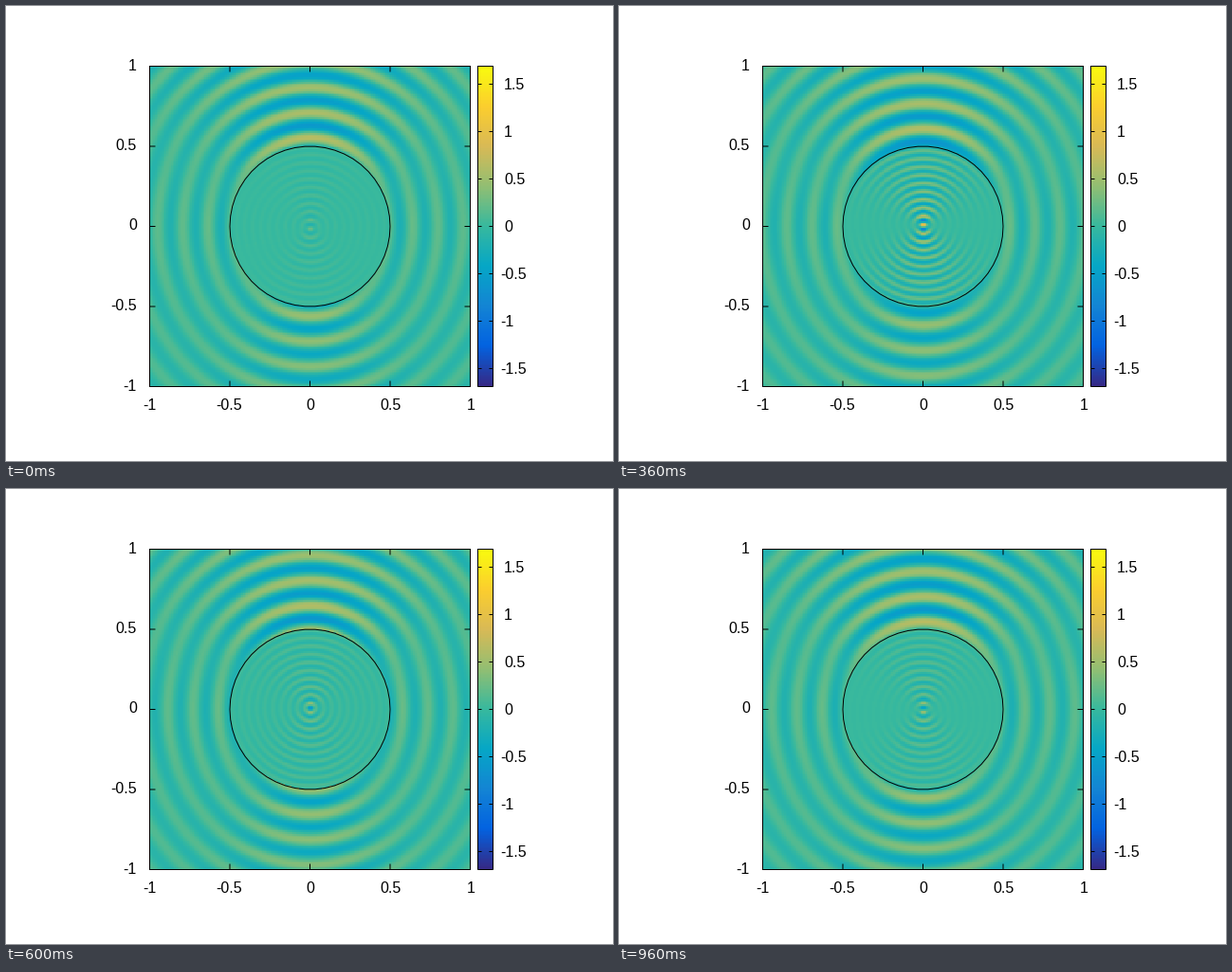
Write a matplotlib script that moves like this. It is 640x480 px and loops after 1000 ms.

```python
import numpy as np
import matplotlib.pyplot as plt
from matplotlib.animation import FuncAnimation
from matplotlib.colors import LinearSegmentedColormap

plt.rcParams["font.family"] = "Liberation Sans"
WIDTH, HEIGHT, DPI = 640, 480, 100
FRAMES, INTERVAL = 25, 40
LEFT, RIGHT, TOP, BOTTOM = 151.5, 489.5, 63.5, 401.5
CX, CY, UNIT = 320.5, 232.5, 169
PIXEL = 72 / DPI
LIMIT = 1.685
RADIUS = 0.5
K_OUT, K_IN = 40, 124
CELLS = 200

PARULA = LinearSegmentedColormap.from_list("waves", [
    "#352a87", "#0363e1", "#1485d4", "#06a7c6", "#38b99e",
    "#92bf73", "#d9ba56", "#fcce2e", "#f9fb0e"], N=256)


def bessel(order, x):
    """Bessel function of the first kind from its integral form."""
    table_x = np.linspace(0, K_IN * RADIUS * 1.05, 1500)
    tau = (np.arange(160) + 0.5) * np.pi / 160
    table = np.cos(order * tau - table_x[:, None] * np.sin(tau)).mean(axis=1)
    return np.interp(x, table_x, table)


def phasor(size, cycles):
    return size * np.exp(2j * np.pi * cycles)


def complex_field():
    """Complex amplitude of the wave; time only turns its phase."""
    axis = (np.arange(CELLS) + 0.5) * 2 / CELLS - 1
    x, y = np.meshgrid(axis, axis)
    r, theta = np.hypot(x, y), np.arctan2(y, x)

    directivity = ((0.154 + 0.076j)
                   - (0.35 - 0.108j) * np.cos(2 * theta)
                   - (0.006 + 0.094j) * np.cos(4 * theta)
                   + (0.09 + 0.09j) * np.sin(theta)
                   - (0.034 + 0.034j) * np.sin(3 * theta))
    outside = directivity * np.sqrt(0.6 / r) * np.exp(1j * K_OUT * (r - 0.55))

    kr = K_IN * np.minimum(r, RADIUS)
    inside = (phasor(0.9, 0.26) * bessel(0, kr)
              + phasor(1.5, 0.29) * bessel(1, kr) * np.sin(theta)
              + phasor(0.7, 0.30) * bessel(2, kr) * np.cos(2 * theta)
              + phasor(0.35, 0.29) * bessel(3, kr) * np.sin(3 * theta))
    return np.where(r < RADIUS, inside, outside)


fig = plt.figure(figsize=(WIDTH / DPI, HEIGHT / DPI), dpi=DPI, facecolor="white")
ax = fig.add_axes([0, 0, 1, 1])
ax.axis("off")


def line(xs, ys, **style):
    ax.plot(xs, ys, color="black", lw=PIXEL, zorder=3, snap=False,
            solid_capstyle="butt", **style)


def box(x0, x1, y0, y1):
    line([x0, x1, x1, x0, x0], [y0, y0, y1, y1, y0], solid_joinstyle="miter")


def label(x, y, value, align):
    ax.text(x, y, f"{value:g}", size=16 * PIXEL, ha=align, va="center_baseline")


def draw_plot_axes():
    box(LEFT, RIGHT, TOP, BOTTOM)
    for value in (-1, -0.5, 0, 0.5, 1):
        x, y = CX + UNIT * value, CY - UNIT * value
        for end, step in ((BOTTOM, -6), (TOP, 6)):
            line([x, x], [end, end + step])
        for end, step in ((LEFT, 6), (RIGHT, -6)):
            line([end, end + step], [y, y])
        label(x + (0.5 if value >= 0 else -0.5), 420, value, "center")
        label(138, y - 2, value, "right")


def draw_colorbar():
    x0, x1 = 497.5, 513.5
    ramp = np.linspace(1, 0, 338)[:, None]
    ax.imshow(ramp, cmap=PARULA, vmin=0, vmax=1, extent=(x0, x1, BOTTOM, TOP),
              aspect="auto", interpolation="nearest")
    box(x0, x1, TOP, BOTTOM)
    for value in np.arange(-1.5, 2, 0.5):
        y = np.floor(CY - value * UNIT / LIMIT) + 0.5
        line([x0, x0 + 4], [y, y])
        line([x1, x1 - 4], [y, y])
        label(525 if value >= 0 else 521, y - 1, value, "left")


wave = complex_field()
picture = ax.imshow(wave.real, cmap=PARULA, vmin=-LIMIT, vmax=LIMIT,
                    origin="lower", extent=(LEFT, RIGHT, BOTTOM, TOP),
                    aspect="auto", interpolation="nearest")
draw_plot_axes()
draw_colorbar()
turn = np.linspace(0, 2 * np.pi, 51)
line(CX + UNIT * RADIUS * np.cos(turn), CY + UNIT * RADIUS * np.sin(turn))
ax.set(xlim=(0, WIDTH), ylim=(HEIGHT, 0))


def update(frame):
    picture.set_data((wave * np.exp(-2j * np.pi * frame / FRAMES)).real)
    return [picture]


animation = FuncAnimation(fig, update, frames=FRAMES, interval=INTERVAL,
                          repeat=True, repeat_delay=0)
plt.show()
```
